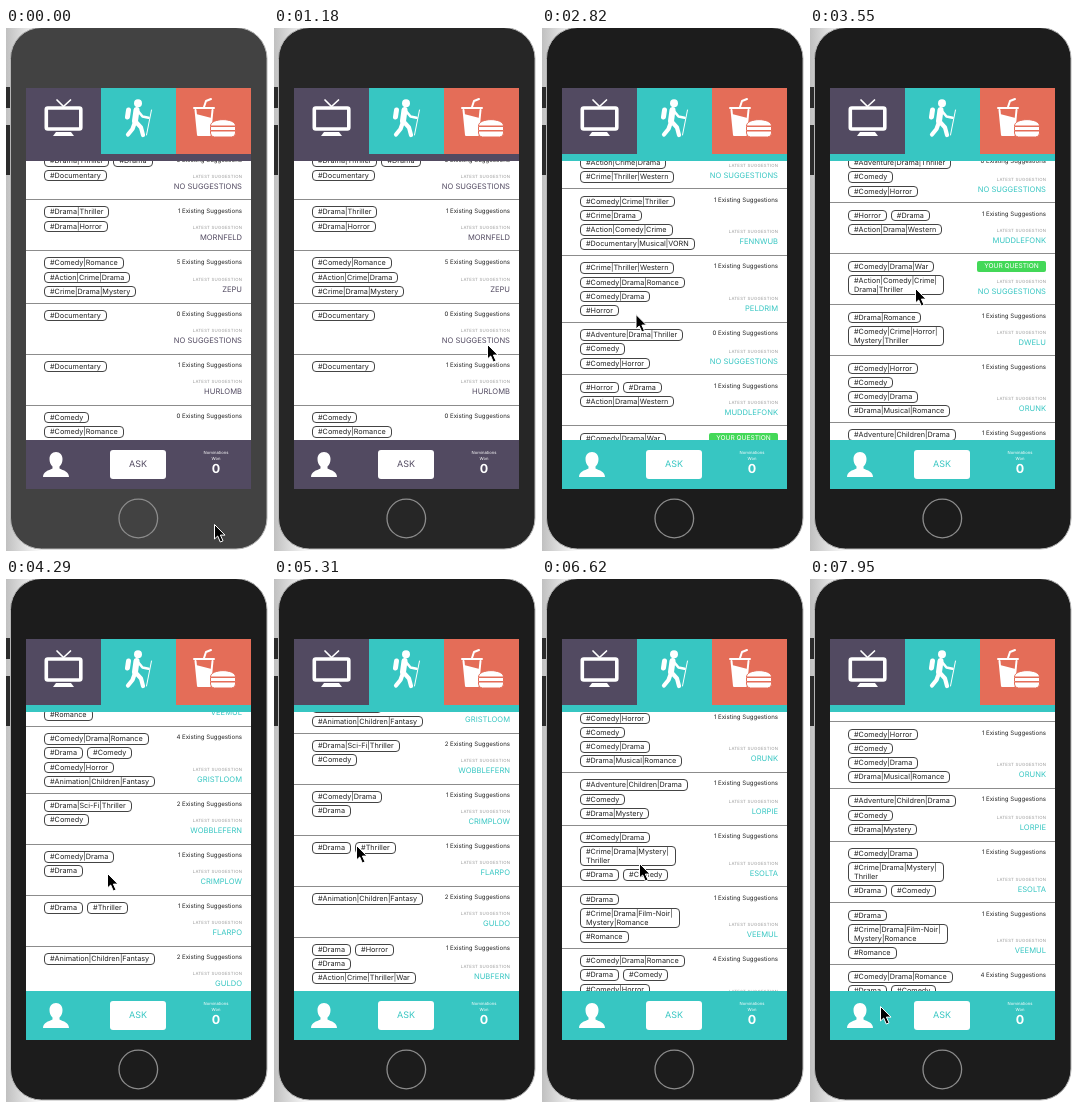
These frames come from a looping animation (262x523 px, 8000 ms). An HTML page:

```html
<!DOCTYPE html>
<html lang="en">
<head>
<meta charset="utf-8">
<title>Suggestion list</title>
<style>
html, body { margin: 0; width: 262px; height: 523px; overflow: hidden; background: #fff; }
body { position: relative; font-family: Inter, Roboto, sans-serif; text-rendering: geometricPrecision; --teal: #37c6c2; --plum: #524a61; }
svg, .abs { position: absolute; left: 0; top: 0; }
#screen { left: 20px; top: 60px; width: 225px; height: 401px; overflow: hidden; background: #fff; }
#strip { top: 66px; width: 226px; height: 7px; z-index: 1; }
.page { top: 73px; width: 226px; height: 328px; background: #fff; color: var(--tone); }
.view { width: 226px; height: 279px; overflow: hidden; }
.list { width: 226px; }
.group { position: relative; box-sizing: border-box; min-height: 51px; padding: 5.1px 0 3.9px 18px; border-top: 1px solid #8c8c8c; }
.row { display: flex; align-items: center; gap: 4px; height: 14.2px; }
.row.tall { height: 23.3px; }
.tag { box-sizing: border-box; padding: 0 5px; border: 1px solid #444; border-radius: 4px; font-size: 7.25px; line-height: 9.5px; color: #222; white-space: pre; }
.tall .tag { line-height: 9px; padding-right: 6px; }
.count, .label, .name { position: absolute; right: 10px; white-space: nowrap; }
.count { top: 7.5px; font-size: 6.1px; line-height: 8px; color: #222; }
.mine { top: 6.8px; width: 69px; font-size: 6.6px; line-height: 11px; text-align: center; color: #fff; background: #43d858; border-radius: 2px; }
.label { bottom: 19.5px; font-size: 4.3px; line-height: 5px; letter-spacing: .25px; margin-right: -.25px; color: #999; }
.name { bottom: 8.5px; font-size: 7.6px; line-height: 9px; }
.foot { top: 279px; width: 226px; height: 49px; background: var(--tone); }
.ask { left: 84px; top: 10px; width: 56px; height: 28.5px; border-radius: 3px; background: #fff; font-size: 9px; line-height: 30px; text-align: center; }
.won { left: 170px; top: 11px; width: 40px; font-size: 4.2px; line-height: 5.5px; text-align: center; color: #fff; }
.won b { display: block; font-size: 12.5px; line-height: 15px; }
</style>
</head>
<body>
<svg width="262" height="523">
  <defs>
    <linearGradient id="shade"><stop stop-color="#c0c0c0"/><stop offset="1" stop-color="#fff"/></linearGradient>
  </defs>
  <rect width="36" height="523" fill="url(#shade)"/>
  <path d="M0 59h6v21H0zM0 97h6v50H0z" fill="#2b2b2b"/>
  <rect id="phone" x="4.5" y="-.5" width="256.5" height="521.5" rx="31" stroke="#b5b5b5"/>
  <circle cx="132.3" cy="490.5" r="19.3" fill="none" stroke="#8c8c8c" stroke-width="1.3"/>
</svg>
<div id="screen" class="abs">
  <div id="strip" class="abs"></div>
  <svg width="226" height="66" viewBox="20 60 226 66" style="z-index:1">
    <path fill="#524a61" d="M20 60h75v66H20z"/>
    <path fill="#37c6c2" d="M95 60h75v66H95z"/>
    <path fill="#e46d58" d="M170 60h76v66h-76z"/>
    <g fill="none" stroke="#fff" stroke-linecap="round" stroke-linejoin="round">
      <rect x="40.3" y="80" width="34.5" height="21" rx="1.5" stroke-width="3.6"/>
      <path stroke-width="1.7" d="M51 72l6.500 6.500 7-6.500"/>
      <path stroke-width="6" d="M130.500 82l-1.500 11"/>
      <path stroke-width="4.2" d="M129 94l-2.500 7-4.500 5.500M130 94l5 5.500 2 7.500"/>
      <path stroke-width="2.6" d="M132 83l4.500 5.500 6 1.200"/>
      <path stroke-width="5" d="M122.500 82l-1 7"/>
      <path stroke-width="1" d="M145.500 82l-5 25"/>
      <path stroke-width="2" d="M198 79l2-6 5-2M188 80h20M189.500 82l2.500 25h12l2.500-25"/>
    </g>
    <g fill="#fff">
      <path d="M50 104h15l3 4H47z"/>
      <circle cx="132" cy="75.3" r="4"/>
      <path d="M190 86l15.500 4-1.500 17h-12z"/>
      <path stroke="#e46d58" d="M204.500 98c0-8.500 25-8.500 25 0zM204.500 98.500h25v4h-25zM204.500 103h25v2q0 4-4 4h-17q-4 0-4-4z"/>
    </g>
  </svg>
</div>
<svg id="cursor" width="14" height="21" viewBox="-1 -1 14 21" style="margin:-1.6px">
  <path d="M.5 .5v14.500l3.200-3 2.600 6 2.700-1.200-2.600-5.700h4.600z" fill="#000" stroke="#fff" stroke-width="1"/>
</svg>
<script>
const $ = id => document.getElementById(id);

// count ~ latest suggestion ~ rows; rows by ";", tags by ",", line breaks by "/"
const none = 'NO SUGGESTIONS';
const tvGroups = [
  `0~${none}~Drama|Thriller,Drama;Documentary`,
  '1~MORNFELD~Drama|Thriller;Drama|Horror',
  '5~ZEPU~Comedy|Romance;Action|Crime|Drama;Crime|Drama|Mystery',
  `0~${none}~Documentary`,
  '1~HURLOMB~Documentary',
  `0~${none}~Comedy;Comedy|Romance;Drama;Horror`
];
const outdoorGroups = [
  '2~TOBQUILL~Comedy|Drama;Crime|Drama|Mystery;Documentary;Adventure|Comedy;Horror,Comedy;Thriller',
  `0~${none}~Thriller,Comedy;Drama;Comedy|Thriller;Documentary;Action|Crime|Drama;Crime|Thriller|Western`,
  '1~FENNWUB~Comedy|Crime|Thriller;Crime|Drama;Action|Comedy|Crime;Documentary|Musical|VORN',
  '1~PELDRIM~Crime|Thriller|Western;Comedy|Drama|Romance;Comedy|Drama;Horror',
  `0~${none}~Adventure|Drama|Thriller;Comedy;Comedy|Horror`,
  '1~MUDDLEFONK~Horror,Drama;Action|Drama|Western',
  `mine~${none}~Comedy|Drama|War;Action|Comedy|Crime|/Drama|Thriller`,
  '1~DWELU~Drama|Romance;Comedy|Crime|Horror|/Mystery|Thriller',
  '1~ORUNK~Comedy|Horror;Comedy;Comedy|Drama;Drama|Musical|Romance',
  '1~LORPIE~Adventure|Children|Drama;Comedy;Drama|Mystery',
  '1~ESOLTA~Comedy|Drama;Crime|Drama|Mystery|/Thriller;Drama,Comedy',
  '1~VEEMUL~Drama;Crime|Drama|Film-Noir|/Mystery|Romance;Romance',
  '4~GRISTLOOM~Comedy|Drama|Romance;Drama,Comedy;Comedy|Horror;Animation|Children|Fantasy',
  '2~WOBBLEFERN~Drama|Sci-Fi|Thriller;Comedy',
  '1~CRIMPLOW~Comedy|Drama;Drama',
  '1~FLARPO~Drama,Thriller',
  '2~GULDO~Animation|Children|Fantasy',
  '1~NUBFERN~Drama,Horror;Drama;Action|Crime|Thriller|War'
];

const rowHtml = row => `<div class="row ${row.includes('/') ? 'tall' : ''}">` +
  row.split(',').map(tag => `<span class="tag">#${tag.replace('/', '\n')}</span>`).join('') + '</div>';

function groupHtml(group) {
  const [count, name, rows] = group.split('~');
  const head = count === 'mine'
    ? '<div class="count mine">YOUR QUESTION</div>'
    : `<div class="count">${count} Existing Suggestions</div>`;
  return `<div class="group">${rows.split(';').map(rowHtml).join('')}${head}
    <div class="label">LATEST SUGGESTION</div><div class="name">${name}</div></div>`;
}

function addPage(groups, tone) {
  const page = document.createElement('div');
  page.className = 'page abs';
  page.style.setProperty('--tone', `var(--${tone})`);
  page.innerHTML = `<div class="view abs"><div class="list">${groups.map(groupHtml).join('')}</div></div>
    <div class="foot abs">
      <svg width="60" height="49"><path fill="#fff" d="M30 12c4 0 6.500 3 6.500 7 0 3-1 5.500-3 7.500v2c4 2 9.500 3 9.500 8.500H17c0-5.500 5.500-6.500 9.500-8.500v-2c-2-2-3-4.500-3-7.500 0-4 2.500-7 6.500-7z"/></svg>
      <div class="ask abs">ASK</div>
      <div class="won abs">Nominations<br>Won<b>0</b></div>
    </div>`;
  $('screen').append(page);
  return page;
}

const tvPage = addPage(tvGroups, 'plum');
const outdoorPage = addPage(outdoorGroups, 'teal');
const outdoorList = outdoorPage.querySelector('.list');
tvPage.querySelector('.list').style.transform = 'translateY(-13px)';

// Keys are [step, value, ...]; values are interpolated linearly.
const scrollKeys = [[0, -19.7], [14, -19.7], [17, -90], [20, -200], [24, -334.6], [29, -757.7], [33, -804],
  [36, -817.7], [39, -774], [42, -614], [45, -536.1], [47, -528], [48, -528], [50, -519.6]];
const slideKeys = [[0, 226], [8, 226], [9, 205], [10, 135], [11, 50], [12, 7], [13, 0]];
const cursorKeys = [[0, 209, 497], [1, 215, 466], [2, 215, 466], [8, 214, 317], [9, 193, 316], [10, 130, 314],
  [11, 83, 313], [14, 83, 313], [24, 106, 261], [29, 102, 295], [36, 83, 267], [38, 250, 288], [39, 251, 285],
  [42, 150, 300], [45, 98, 285], [47, 130, 288], [48, 130, 288], [50, 222, 301], [51, 222, 301],
  [52, 190, 340], [53, 115, 413], [54, 71, 428]];

function at(keys, step) {
  const i = keys.findIndex(key => key[0] > step);
  if (i < 0) return keys.at(-1).slice(1);
  const a = keys[i - 1], b = keys[i], p = (step - a[0]) / (b[0] - a[0]);
  return a.slice(1).map((v, n) => v + (b[n + 1] - v) * p);
}

const start = performance.now();

function draw(now) {
  const time = Math.max(0, now - start) % 8000;
  const step = Math.min(54, Math.floor((time + 8) / 147.1));
  const [slide] = at(slideKeys, step);
  const [scroll] = at(scrollKeys, step);
  const [x, y] = at(cursorKeys, step);
  const gray = 66 - 38 * Math.min(1, Math.max(0, (step - 2) / 8));
  $('phone').style.fill = `rgb(${gray},${gray},${gray})`;
  $('strip').style.background = `var(--${step < 13 ? 'plum' : 'teal'})`;
  tvPage.style.transform = `translateX(${slide - 226}px)`;
  outdoorPage.style.transform = `translateX(${slide}px)`;
  outdoorList.style.transform = `translateY(${Math.round(scroll)}px)`;
  $('cursor').style.transform = `translate(${x}px,${y}px)`;
  requestAnimationFrame(draw);
}
draw(start);
</script>
</body>
</html>
```
